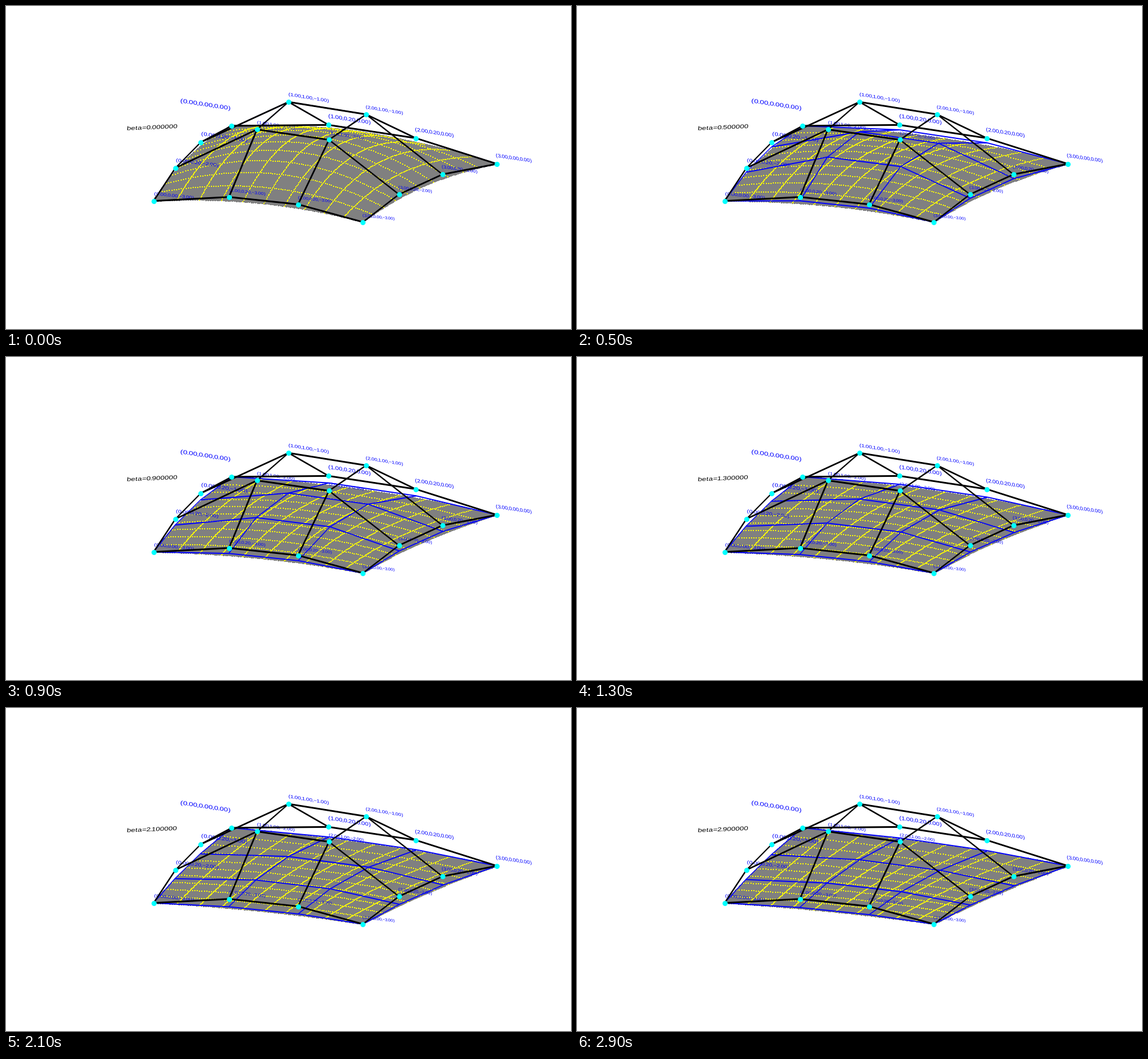
These frames come from a looping animation (990 px wide and 566 px high, 3 s). A matplotlib script:

```python
import numpy as np
import matplotlib.pyplot as plt
from matplotlib.animation import FuncAnimation
from matplotlib.collections import LineCollection, PolyCollection
from matplotlib.patches import PathPatch
from matplotlib.path import Path
from matplotlib.textpath import TextPath

W, H, DPI = 990, 566, 100
FRAMES, INTERVAL = 30, 100
PX = 72 / DPI
GRAY, YELLOW, BLUE, CYAN = "#808080", "#ffff00", "#0000ff", "#00ffff"


# ---- camera --------------------------------------------------------------

EYE, TARGET = np.array([-2, -3, 6]), np.array([1, 0, -1])
FOV, ASPECT = np.radians(30), 1.4


def unit(v):
    return v / np.linalg.norm(v)


FORWARD = unit(TARGET - EYE)
RIGHT = unit(np.cross(FORWARD, [0, 1, 0]))
UP = np.cross(RIGHT, FORWARD)


def project(points):
    p = np.asarray(points, float) - EYE
    depth = p @ FORWARD * np.tan(FOV / 2)
    x = W / 2 * (1 + p @ RIGHT / (depth * ASPECT))
    y = H / 2 * (1 - p @ UP / depth)
    return np.stack([x, y], axis=-1)


# ---- surface -------------------------------------------------------------

GX, GZ = np.meshgrid(np.arange(4.0), -np.arange(4.0))

# Corners lie flat, edges rise a little, the inner points most
INNER = np.array([0, 1, 1, 0])
HEIGHTS = np.choose(INNER[:, None] + INNER, [0.0, 0.2, 1.0])


def net(heights):
    return np.stack([GX, heights, GZ], axis=-1)


def smooth(h, beta):
    """Relax the inner two rows towards their neighbours, ends held."""
    system = (1 + 3 * beta) * np.eye(2) - beta
    out = h.copy()
    out[1:3] = np.linalg.solve(system, h[1:3] + beta * h[[0, 3]])
    return out


def relaxed(beta):
    return smooth(smooth(HEIGHTS.T, beta).T, beta)


def bernstein(t):
    s = 1 - t
    return np.stack([s**3, 3 * s * s * t, 3 * s * t * t, t**3], axis=-1)


BASIS = bernstein(np.linspace(0, 1, 101))


def surface(ctrl):
    return project(np.einsum("ai,bj,ijk->abk", BASIS, BASIS, ctrl))


def quads(grid):
    g = grid[::4, ::4]
    cells = np.stack([g[:-1, :-1], g[:-1, 1:], g[1:, 1:], g[1:, :-1]], axis=2)
    return cells.reshape(-1, 4, 2)


def squares(points, size):
    """Pixel-aligned square dots."""
    corner = np.round(points.reshape(-1, 1, 2) - size / 2)
    return corner + size * np.array([[0, 0], [1, 0], [1, 1], [0, 1]])


def isolines(grid):
    rows = grid[10:91:10].reshape(-1, 2)
    cols = grid[:, 10:91:10].reshape(-1, 2)
    return np.concatenate([rows, cols])


def net_segments(ctrl):
    p = project(ctrl)
    along_x = np.stack([p[:, :-1], p[:, 1:]], axis=2).reshape(-1, 2, 2)
    along_z = np.stack([p[:-1], p[1:]], axis=2).reshape(-1, 2, 2)
    return np.concatenate([along_x, along_z])


def raster_widths(segs, px):
    """Line width measured along the minor axis, as in plain rasterisers."""
    d = np.abs(segs[:, 1] - segs[:, 0])
    return px * PX * d.max(axis=1) / np.hypot(d[:, 0], d[:, 1])


# ---- lettering standing in the scene -------------------------------------

FONT = {"family": "Liberation Sans"}
UNIT = 0.0005
SIZE, SPACING = 145, 12


def glyph(ch):
    path = TextPath((0, 0), ch, size=SIZE, prop=FONT)
    box = path.get_extents()
    return path.vertices - [box.x0, 0], path.codes, box.width


GLYPHS = {ch: glyph(ch) for ch in "0123456789.,()=beta\u2212"}


def lettering(text, origin, direction=(1, 0, 0)):
    axes = np.array([direction, (0, 1, 0)])
    verts, codes, pen = [], [], SPACING / 2
    for ch in text.replace("-", "\u2212"):
        shape, code, width = GLYPHS[ch]
        verts.append(project(origin + (shape + [pen, 0]) * UNIT @ axes))
        codes.append(code)
        pen += width + SPACING
    return Path(np.concatenate(verts), np.concatenate(codes))


def point_labels():
    for x, y, z in net(HEIGHTS).reshape(-1, 3) + 0.0:
        at_origin = x == y == z == 0
        shift = (-0.5, 0.2, 0) if at_origin else (0, 0.1, 0)
        yield lettering(f"({x:.2f},{y:.2f},{z:.2f})", np.add((x, y, z), shift))


TURN = np.radians(30)
BETA_DIR = np.array([np.cos(TURN), 0, np.sin(TURN)])


def beta_label(beta):
    return lettering(f"beta={beta:.6f}", -BETA_DIR, BETA_DIR)


# ---- scene ---------------------------------------------------------------

fig = plt.figure(figsize=(W / DPI, H / DPI), dpi=DPI, facecolor="white")
ax = fig.add_axes([0, 0, 1, 1])
ax.set_xlim(0, W)
ax.set_ylim(H, 0)
ax.axis("off")


def polys(color, z):
    coll = PolyCollection([], facecolors=color, edgecolors="none",
                          linewidths=0, antialiaseds=False, zorder=z)
    return ax.add_collection(coll, autolim=False)


def lines(color, z):
    coll = LineCollection([], colors=color, zorder=z, capstyle="butt")
    return ax.add_collection(coll, autolim=False)


def letters(path, color, z):
    return ax.add_patch(PathPatch(path, fc=color, ec="none", lw=0, zorder=z))


def set_net(coll, ctrl, px):
    segs = net_segments(ctrl)
    coll.set_segments(segs)
    coll.set_linewidths(raster_widths(segs, px))


fill = polys(GRAY, 1)
grain = polys(GRAY, 2)
iso = polys(YELLOW, 3)
soft_net = lines(BLUE, 4)
for label in point_labels():
    letters(label, BLUE, 5)
hard_net = lines("black", 6)
set_net(hard_net, net(HEIGHTS), 3)
ax.plot(*project(net(HEIGHTS)).reshape(-1, 2).T, ls="none", marker="o",
        ms=9 * PX, mew=0, color=CYAN, zorder=7)
beta_text = letters(beta_label(0), "black", 8)


def draw(frame):
    beta = frame / 10
    ctrl = net(relaxed(beta))
    grid = surface(ctrl)
    fill.set_verts(quads(grid))
    grain.set_verts(squares(grid, 3))
    iso.set_verts(squares(isolines(grid), 2))
    set_net(soft_net, ctrl, 2)
    beta_text.set_path(beta_label(beta))
    return fill, grain, iso, soft_net, beta_text


anim = FuncAnimation(fig, draw, frames=FRAMES, interval=INTERVAL,
                     init_func=lambda: draw(0), repeat=True, repeat_delay=0)
plt.show()
```
